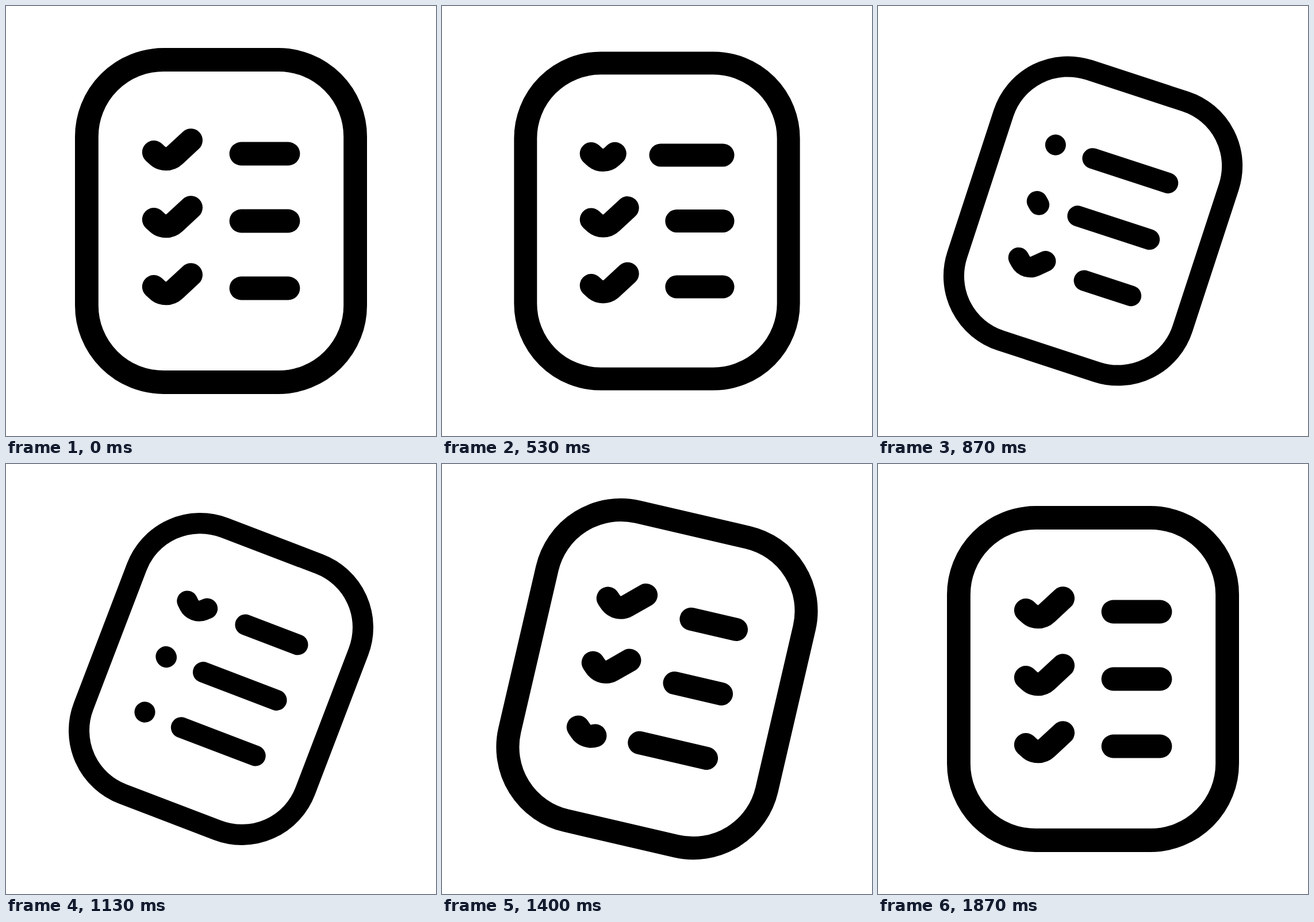
Animation, 748 px wide and 748 px high, one loop 1.94 s. Source, as an HTML page:

```html
<!DOCTYPE html>
<html lang="en">
<head>
<meta charset="utf-8">
<title>Checklist</title>
<style>
  html, body { margin: 0; height: 100%; overflow: hidden; background: #fff; }
  svg { display: block; width: 100%; height: 100%; }
</style>
</head>
<body>
<svg viewBox="-374 -374 748 748">
  <g id="sheet" fill="none" stroke="#000" stroke-width="40.8" stroke-linecap="round">
    <rect x="-233.6" y="-280.5" width="467.2" height="561" rx="133.6"/>
  </g>
</svg>
<script>
const LOOP = 1940;
const ROW_GAP = 117;
const BAR_GROWTH = 74;
const CHECK = 'M-116.8 -2.6L-110.9 2.8A22 22 0 0 0 -80.7 2.8L-52.4 -23.4';

const sheet = document.getElementById('sheet');

// Start and duration of each row's erase and redraw
const rows = [
  { erase: [363, 398], redraw: [934, 340] },
  { erase: [624, 306], redraw: [1103, 340] },
  { erase: [782, 306], redraw: [1240, 340] },
].map((timing, i) => {
  const row = add('g', sheet, { transform: `translate(0 ${(i - 1) * ROW_GAP})` });
  const check = add('path', row, { d: CHECK });
  return { ...timing, check, length: check.getTotalLength(), bar: add('path', row, {}) };
});

function add(tag, parent, attrs) {
  const el = document.createElementNS(parent.namespaceURI, tag);
  for (const name in attrs) el.setAttribute(name, attrs[name]);
  return parent.appendChild(el);
}

function ease(t, start, duration) {
  const x = Math.min(1, Math.max(0, (t - start) / duration));
  return x * x * (3 - 2 * x);
}

function draw(t) {
  const angle = 21.5 * (ease(t, 597, 366) - ease(t, 1050, 820));
  const scale = 1 - 0.13 * (ease(t, 374, 616) - ease(t, 1035, 475));
  sheet.setAttribute('transform', `rotate(${angle}) scale(${scale})`);

  for (const { erase, redraw, check, length, bar } of rows) {
    const hidden = ease(t, ...erase) - ease(t, ...redraw);
    const visible = Math.max(0.01, length * (1 - hidden));
    check.setAttribute('stroke-dasharray', hidden ? `${visible} 999` : 'none');
    bar.setAttribute('d', `M${35 - BAR_GROWTH * hidden} 0H117`);
  }
}

const start = performance.now();
function tick() {
  draw((performance.now() - start) % LOOP);
  requestAnimationFrame(tick);
}
tick();
</script>
</body>
</html>
```
